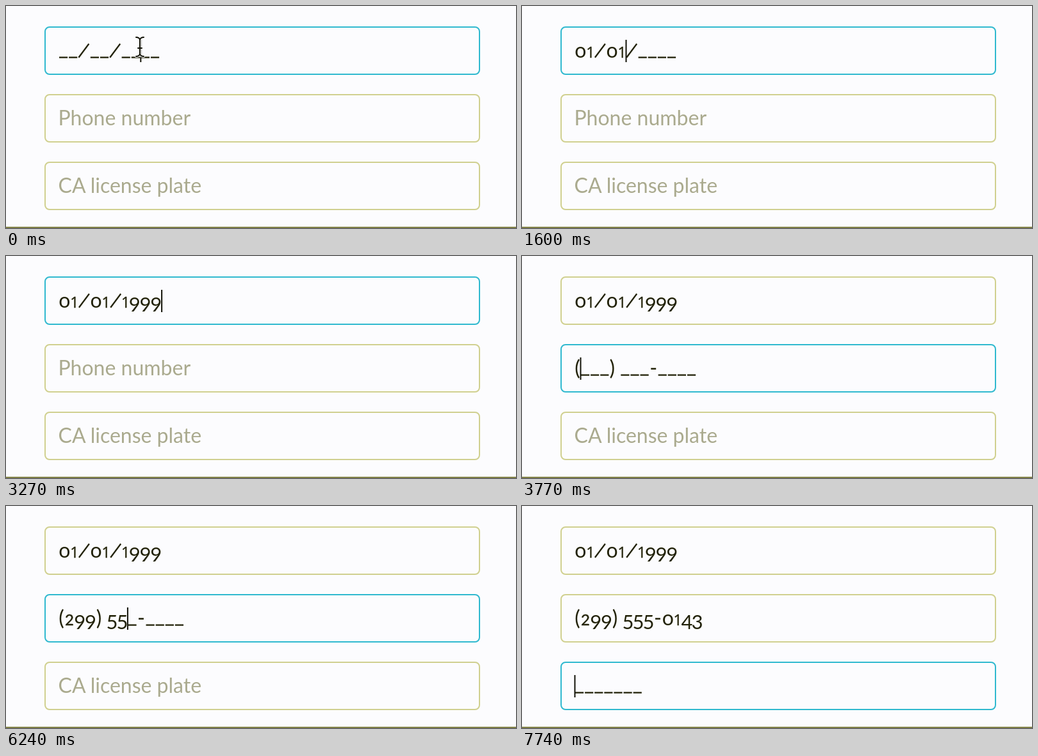
Write an HTML page that moves like this. It is 796 by 348 pixels and loops after 8000 ms.

```html
<!DOCTYPE html>
<html lang="en">
<head>
<meta charset="utf-8">
<title>Masked inputs</title>
<style>
  html, body { margin: 0; width: 100%; height: 100%; overflow: hidden; background: #fcfcfe; }
  svg { display: block; width: 796px; height: 348px; font: 32px Lato, sans-serif; }
  .box { fill: none; stroke-width: 2; }
  .value { fill: #222208; }
  .value path { stroke: #222208; stroke-width: 2.3; fill: none; }
  .value .small { font: 24px "Open Sans", sans-serif; stroke: #222208; stroke-width: .3; }
  .value .two { font-size: 24px; stroke: #222208; stroke-width: .4; }
  .value .low { font-size: 31px; }
  .hint { fill: #aaaa8e; }
  .caret { fill: #111106; }
</style>
</head>
<body>
<svg id="stage" viewBox="0 0 796 348">
  <rect y="346" width="796" height="2" fill="#85854a"/>
  <g id="fields"></g>
  <g id="pointer" fill="none" stroke-linecap="round">
    <path id="beam" stroke="#fcfcfe" stroke-width="4"
      d="M203 49 Q208 49 209 53 Q210 49 215 49 M209 53 V75 M203 79 Q208 79 209 75 Q210 79 215 79 M206 66 H212"/>
    <use href="#beam"/>
  </g>
</svg>
<script>
const LOOP = 8000, FADE = 140, BLINK = 500, LEFT = 82;
const IDLE = [208, 208, 143], ACTIVE = [47, 185, 207];

const fields = [
  { hint: 'Date of birth', mask: '__/__/____', digits: '01011999', focus: -1000, first: 290, step: 390 },
  { hint: 'Phone number', mask: '(___) ___-____', digits: '2995550143', focus: 3410, first: 5020, step: 265 },
  { hint: 'CA license plate', mask: '_______', digits: '', focus: 7600, first: LOOP, step: 1 }
];

const advance = {
  '_': 15.1, '/': 18.6, '(': 9, ')': 9, ' ': 8, '-': 13,
  0: 18.8, 1: 11.9, 2: 16, 3: 15.6, 4: 16.6, 5: 16, 9: 16.7
};

// Old-style figures: round x-height zero, small 1 and 2, the rest hang below the baseline.
function glyph(char, x, y) {
  if (char === ' ') return '';
  if (char === '_') return `<path d="M${x + 1} ${y - .4}h13.2"/>`;
  if (char === '/') return `<path d="M${x + 1.2} ${y - .3}l16 -21.5"/>`;
  const style = char === '1' ? 'small' : char === '2' ? 'two' : /[3-9]/.test(char) ? 'low' : '';
  const drop = style === 'low' ? 6 : 0;
  const shape = char === '0' ? 'o' : char;
  return `<text class="${style}" text-anchor="middle" x="${x + advance[char] / 2}" y="${y + drop}">${shape}</text>`;
}

function fill({ mask, digits }, count) {
  let used = 0, end = mask.indexOf('_');
  const text = [...mask].map((char, i) => {
    if (char !== '_' || used >= count) return char;
    end = i + 1;
    return digits[used++];
  }).join('');
  return { text, end };
}

const widthOf = text => [...text].reduce((sum, char) => sum + advance[char], 0);

function drawValue(text, y) {
  let x = LEFT;
  return [...text].map(char => {
    const part = glyph(char, x, y);
    x += advance[char];
    return part;
  }).join('');
}

document.getElementById('fields').innerHTML = fields.map((_, i) =>
  `<rect class="box" x="61" y="${33 + 106 * i}" width="678" height="74" rx="7"/>
   <g class="value"></g><rect class="caret" y="${53 + 106 * i}" width="2" height="35"/>`).join('');
const boxes = document.querySelectorAll('.box');
const values = document.querySelectorAll('.value');
const carets = document.querySelectorAll('.caret');
const pointer = document.getElementById('pointer');
pointer.lastElementChild.style.stroke = '#111106';
pointer.innerHTML = pointer.innerHTML.replace(/<use[^>]*>(<\/use>)?/, '') +
  `<path stroke="#111106" stroke-width="2" d="${document.getElementById('beam').getAttribute('d')}"/>`;

const ramp = (time, start) => Math.min(1, Math.max(0, (time - start) / FADE));
const shown = [];

function render(time) {
  fields.forEach((field, i) => {
    const next = fields[i + 1];
    const blur = next ? next.focus : Infinity;
    const glow = ramp(time, field.focus) - ramp(time, blur);
    const color = IDLE.map((c, k) => Math.round(c + (ACTIVE[k] - c) * glow));
    boxes[i].style.stroke = `rgb(${color})`;

    const typed = Math.floor((time - field.first) / field.step) + 1;
    const count = Math.max(0, Math.min(field.digits.length, typed));
    const { text, end } = fill(field, count);
    const y = 81 + 106 * i;
    const content = time < field.focus ? field.hint : text;
    if (shown[i] !== content) {
      shown[i] = content;
      values[i].innerHTML = content === field.hint
        ? `<text class="hint" x="81.5" y="${y}">${content}</text>`
        : drawValue(content, y);
    }

    const focused = time >= field.focus && time < blur;
    const lastKey = count ? field.first + (count - 1) * field.step : Math.max(0, field.focus);
    const lit = Math.floor((time - lastKey) / BLINK) % 2 === 0;
    const clicked = i === 0 && count === 0;
    carets[i].setAttribute('x', LEFT - .5 + widthOf(text.slice(0, clicked ? 8 : end)));
    carets[i].style.display = focused && lit ? '' : 'none';
  });
  pointer.style.display = time < fields[0].first ? '' : 'none';
}

const origin = performance.now();
function tick() {
  render((performance.now() - origin) % LOOP);
  requestAnimationFrame(tick);
}
render(0);
tick();
</script>
</body>
</html>
```
